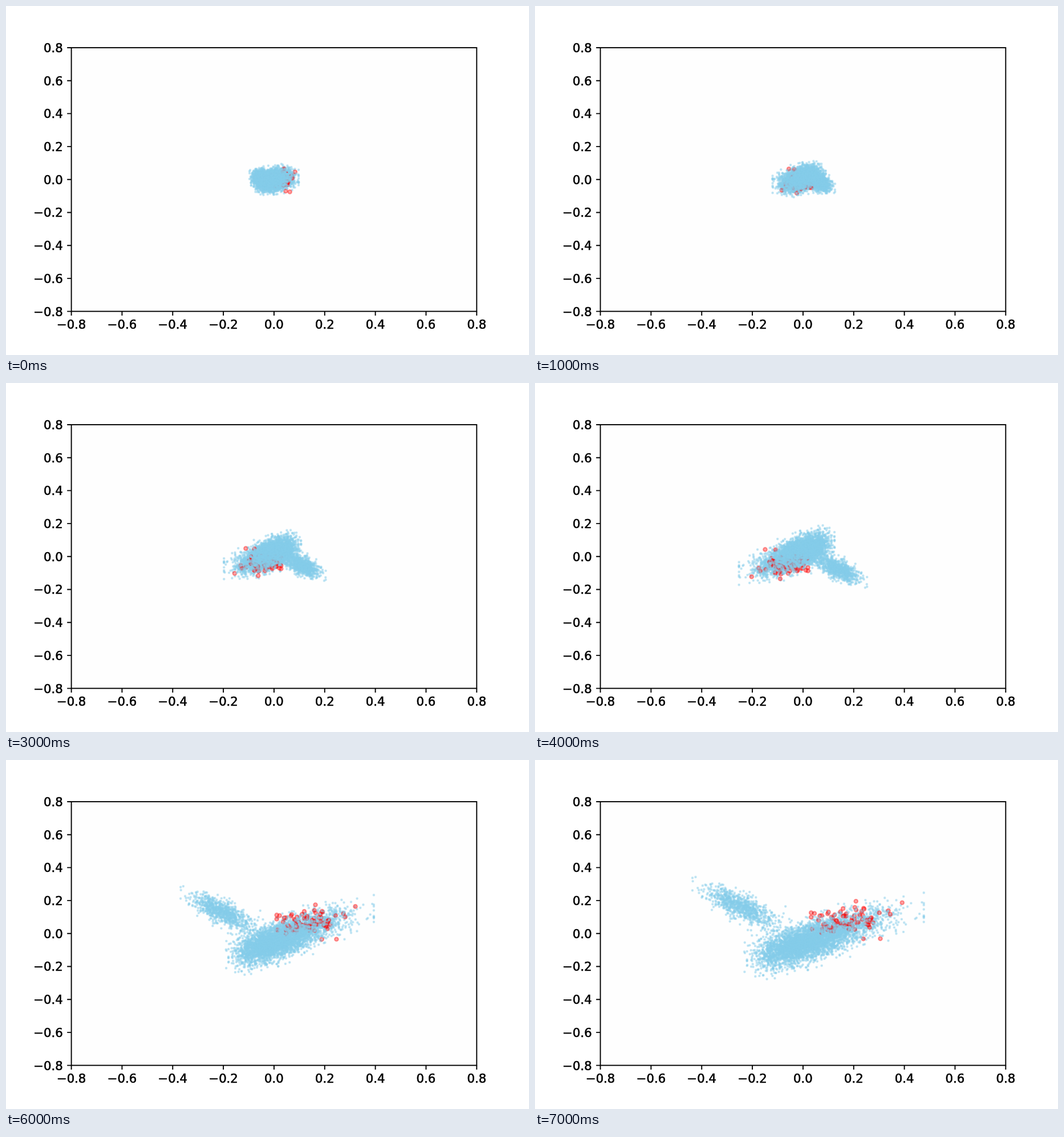
An HTML page with a canvas for the animation above (8 s loop, 917 by 611 pixels).

```html
<!DOCTYPE html>
<html lang="en">
<head>
<meta charset="utf-8">
<title>Scatter plot</title>
<style>
html, body { margin: 0; width: 100%; height: 100%; overflow: hidden; background: #fff; }
canvas { display: block; }
</style>
</head>
<body>
<canvas id="stage" width="917" height="611"></canvas>
<script>
const ctx = document.getElementById('stage').getContext('2d');
const BOX = { left: 114.6, right: 825.3, top: 73, bottom: 534.6 };
const CENTER = { x: 470, y: 304 };
const STEP_MS = 1000, STEPS = 8;
const TAU = Math.PI * 2;
const BLUE = 'rgba(135,206,235,0.38)';
const RED = 'rgba(255,0,0,0.36)';

let seed = 20117;
function random() {
  seed = (seed + 0x6D2B79F5) | 0;
  let t = Math.imul(seed ^ (seed >>> 15), 1 | seed);
  t = (t + Math.imul(t ^ (t >>> 7), 61 | t)) ^ t;
  return ((t ^ (t >>> 14)) >>> 0) / 4294967296;
}
function gauss(limit) {
  const g = Math.sqrt(-2 * Math.log(1 - random())) * Math.cos(TAU * random());
  return Math.max(-limit, Math.min(limit, g));
}

// Each point keeps its place in the cluster while the cluster is reshaped.
const makePoints = (count, reach) =>
  Array.from({ length: count }, () => ({ along: gauss(reach), across: gauss(3.2) }));
const mainCloud = makePoints(4500, 3.1);
const sideCloud = makePoints(850, 2.9);
const redCloud = makePoints(78, 1.9);
const strays = Array.from({ length: 36 }, () => ({ along: -1.2 - 1.3 * random(), across: gauss(2) - 0.8 }));

// Quadratic through the values a, b, c at steps 1, 4 and 7.
function curve(k, a, b, c) {
  const u = (k - 1) / 3;
  return a + (b - a) * u + (c - 2 * b + a) * u * (u - 1) / 2;
}

function dot(x, y, radius) {
  ctx.beginPath();
  ctx.arc(x, y, radius, 0, TAU);
  ctx.fill();
  ctx.stroke();
}

function drawPoints(k) {
  const q = (a, b, c) => curve(k, a, b, c);
  const flip = k >= 1 && k <= 4 ? -1 : 1;

  function drawCloud(points, shape, color = BLUE, radius = 1.3) {
    ctx.fillStyle = ctx.strokeStyle = color;
    for (const { along, across } of points) {
      const dx = shape.spread * (along + shape.skew * (along * along - 1));
      const dy = shape.slope * dx + shape.width * across;
      dot(CENTER.x + flip * (shape.x + dx), CENTER.y + flip * (shape.y + dy), radius);
    }
  }

  const main = {
    x: q(3, 10, 18), y: q(1, 5, 11), spread: q(15, 27, 50),
    slope: q(-0.22, -0.36, -0.31), width: q(9, 12, 15.5), skew: q(0.03, 0.08, 0.09)
  };
  const side = {
    x: q(-30, -60, -107), y: q(-5, -21, -46), spread: q(9, 18, 30),
    slope: q(0.3, 0.41, 0.44), width: q(7, 8.5, 11), skew: 0
  };
  const red = {
    x: k ? q(8, 34, 83) : 15, y: q(-3, -13, -23), spread: q(13.5, 26, 42),
    slope: -0.14, width: q(8, 10, 13), skew: 0.1
  };
  const split = Math.round(mainCloud.length * 0.72);

  ctx.lineWidth = 2.12;
  drawCloud(sideCloud, side);
  drawCloud(mainCloud.slice(0, split), main);
  drawCloud(strays, { ...main, skew: 0 });
  drawCloud(redCloud, red, RED, 3.3);
  drawCloud(mainCloud.slice(split), main);
}

function drawLabel(text, x, y, align) {
  ctx.textAlign = align;
  ctx.fillText(text, x, y);
  ctx.strokeText(text, x, y);
}

function drawAxes() {
  const { left, right, top, bottom } = BOX;
  ctx.strokeStyle = ctx.fillStyle = '#000';
  ctx.font = '21.2px "DejaVu Sans", sans-serif';
  ctx.textBaseline = 'alphabetic';
  ctx.lineWidth = 0.6;
  const ticks = new Path2D();
  for (let i = 0; i <= 8; i++) {
    const value = (i - 4) / 5;
    const label = (value < 0 ? '\u2212' : '') + Math.abs(value).toFixed(1);
    const x = left + (right - left) * i / 8;
    const y = bottom - (bottom - top) * i / 8;
    ticks.moveTo(x, bottom);
    ticks.lineTo(x, bottom + 7.4);
    ticks.moveTo(left, y);
    ticks.lineTo(left - 7.4, y);
    drawLabel(label, x, 565.2, 'center');
    drawLabel(label, 99.8, y + 7.9, 'right');
  }
  ctx.lineWidth = 1.9;
  ctx.stroke(ticks);
  ctx.strokeRect(left, top, right - left, bottom - top);
}

function draw(k) {
  ctx.fillStyle = '#fff';
  ctx.fillRect(0, 0, 917, 611);
  ctx.fillStyle = '#fefefe';
  ctx.fillRect(BOX.left, BOX.top, BOX.right - BOX.left, BOX.bottom - BOX.top);
  drawPoints(k);
  drawAxes();
}

let shown = -1;
const start = performance.now();
function tick() {
  const k = Math.floor((performance.now() - start) / STEP_MS) % STEPS;
  if (k !== shown) draw(shown = k);
  requestAnimationFrame(tick);
}
tick();
</script>
</body>
</html>
```
